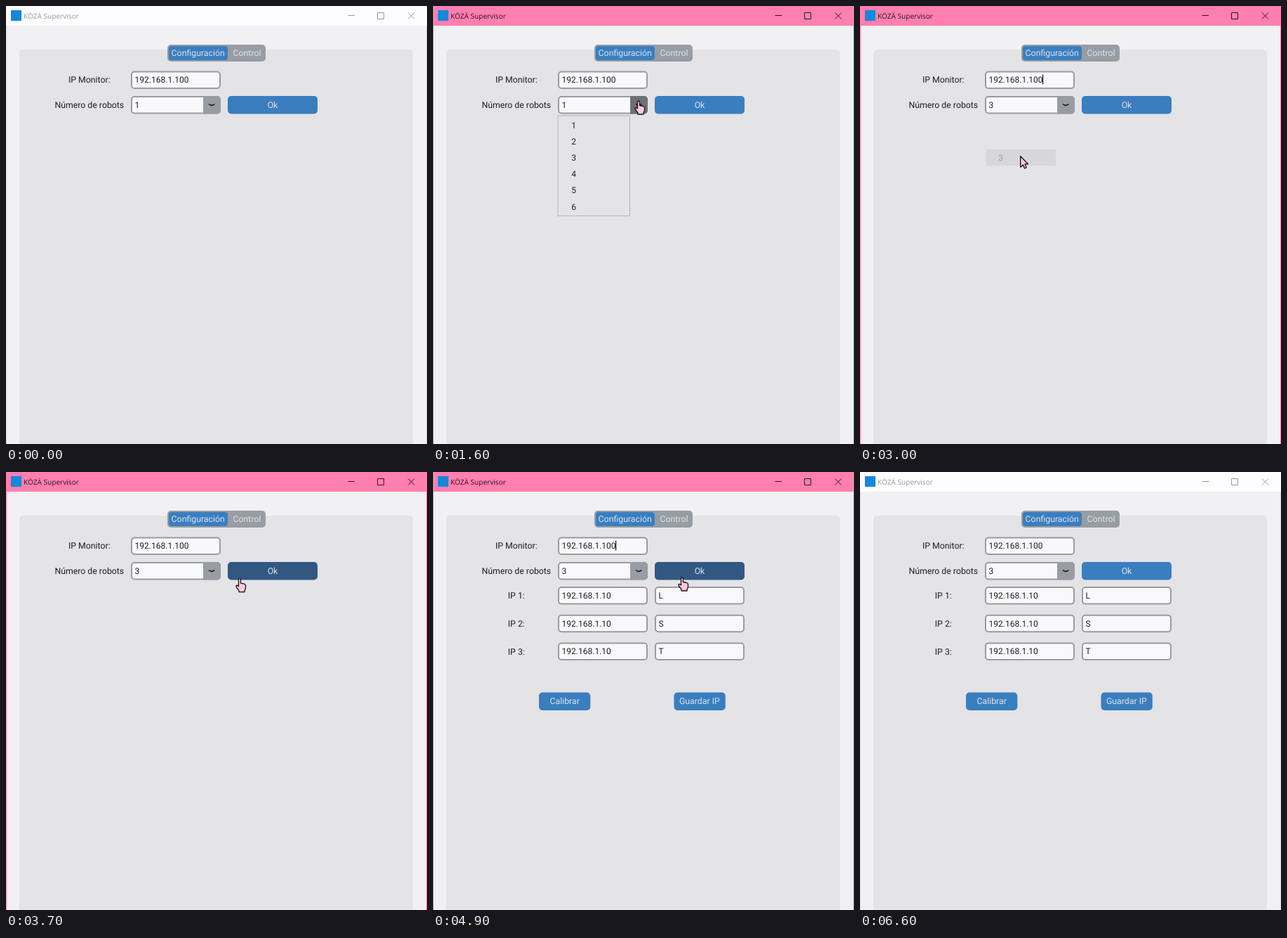
These frames come from a looping animation (600x623 px, 6700 ms). An HTML page:

```html
<!DOCTYPE html>
<html lang="es">
<head>
<meta charset="utf-8">
<title>Configuración</title>
<style>
  html, body { margin: 0; width: 100%; height: 100%; overflow: hidden; background: #f1f0f3; }
  svg { display: block; width: 600px; height: 623px; }
  text { font: 12.3px Roboto, sans-serif; fill: #1f1f21; text-rendering: geometricPrecision; white-space: pre; }
  .mid { text-anchor: middle; }
  .light { fill: #dce4ee; }
  .value { font-size: 12px; }
  .field { fill: #f9f9fb; stroke: #979da2; stroke-width: 2; }
  .button { fill: #3a7ebf; }
  .button.hover { fill: #325882; }
  .grey { fill: #979da2; }
  .grey.hover { fill: #6e7174; }
  .pointer { fill: #ffc9de; stroke: #141014; stroke-width: 1.3; stroke-linejoin: round; }

  #bar { fill: #fdfcfe; }
  #edges { fill: #dcdbde; }
  #caption { font: 10.1px "Open Sans", sans-serif; fill: #99979a; }
  #controls { fill: none; stroke: #99979a; }
  .active #bar, .active #edges { fill: #ff7fae; }
  .active #caption { fill: #2b1620; }
  .active #controls { stroke: #2b1620; }
</style>
</head>
<body>
<svg id="stage" viewBox="0 0 600 623">
  <rect width="600" height="623" fill="#f1f0f3"/>
  <path id="edges" d="M0 28h1v595h-1zM599 28h1v595h-1z"/>
  <rect id="bar" width="600" height="28"/>
  <rect x="7" y="6" width="15" height="15" fill="#1488dc"/>
  <text id="caption" x="25" y="18">KÖZÄ Supervisor</text>
  <path id="controls" d="M487.500 13.500h9.500M529.500 9.500h9v9h-9zM573 9.500l9 9M582 9.500l-9 9"/>

  <rect x="19" y="62" width="561" height="580" rx="5" fill="#e4e3e6"/>
  <rect class="grey" x="230" y="55" width="140" height="24" rx="5"/>
  <rect class="button" x="232" y="57" width="84" height="20" rx="4"/>
  <text class="mid light" x="273.700" y="71">Configuración</text>
  <text class="mid light" x="343.500" y="71">Control</text>

  <text class="mid" x="118.800" y="109.200">IP Monitor:</text>
  <rect class="field" x="179" y="93.500" width="126" height="23.500" rx="4"/>
  <text class="value" x="183.600" y="109">192.168.1.100</text>
  <rect id="caret" x="260" y="97.500" width="1.200" height="14" fill="#111"/>

  <text class="mid" x="118.800" y="144.700">Número de robots</text>
  <rect class="field" x="179" y="129" width="126" height="23.500" rx="4"/>
  <path id="drop" class="grey" d="M281 128h20a5 5 0 0 1 5 5v15.500a5 5 0 0 1-5 5h-20z"/>
  <path d="M289.500 139.700q3.700 3.300 7.400 0" fill="none" stroke="#161616" stroke-width="1.500" stroke-linecap="round"/>
  <text id="count" class="value" x="183.600" y="144.600">1</text>
  <rect id="ok" class="button" x="316" y="128" width="128" height="25.500" rx="5"/>
  <text class="mid light" x="380" y="144.600">Ok</text>

  <g id="labels"></g>
  <g id="entries"></g>
  <g id="actions">
    <rect class="button" x="151" y="313.500" width="73.300" height="25.500" rx="5"/>
    <text class="mid light" x="187.700" y="330.200">Calibrar</text>
    <rect class="button" x="343.500" y="313.500" width="73.300" height="25.500" rx="5"/>
    <text class="mid light" x="379.900" y="330.200">Guardar IP</text>
  </g>

  <rect id="menu" x="178" y="156" width="102.500" height="142.500" fill="#e4e3e6" stroke="#b4b3b6"/>
  <rect id="highlight" x="179.500" width="99.500" height="23.300" fill="#bdbcbe"/>
  <g id="options"></g>
  <text id="picked" class="value" x="197.200" y="220">3</text>

  <path id="arrow" class="pointer" d="M.7.800V16.200L4.300 12.900 6.700 18 9.300 16.900 7 11.800H11.500z"/>
  <path id="hand" class="pointer" d="M-1.500 11V1.500a1.500 1.500 0 0 1 3 0V6.500l5 1q2 .6 2 2.500v3q0 2-1.500 4v2h-8v-2L-5 11.500q-.5-2.200 1.300-2z"/>
</svg>
<script>
const LOOP = 6700, STEP = 100;
const ROW_TOP = 157.6, ROW_HEIGHT = 23.2;
const el = id => document.getElementById(id);
const show = (id, visible) => { el(id).style.display = visible ? '' : 'none'; };
const between = (t, from, to) => t >= from && t < to;

const field = (x, y, value) =>
  `<rect class="field" x="${x + 1}" y="${y - 11.7}" width="126" height="23.5" rx="4"/>
   <text class="value" x="${x + 5.6}" y="${y + 4}">${value}</text>`;
const rowY = i => 175.8 + 39.7 * i;
const robots = ['L', 'S', 'T'];

el('labels').innerHTML = robots.map((_, i) =>
  `<text class="mid" x="118.8" y="${rowY(i) + 4.4}">IP ${i + 1}:</text>`).join('');
el('entries').innerHTML = robots.map((name, i) =>
  field(178, rowY(i), '192.168.1.10') + field(316, rowY(i), name)).join('');
el('options').innerHTML = [1, 2, 3, 4, 5, 6].map(n =>
  `<text class="value" x="197.2" y="${173.6 + ROW_HEIGHT * (n - 1)}">${n}</text>`).join('');

// Pointer path: time, x, y
const path = [
  [600, 294, 136], [700, 293, 135], [1600, 293, 135], [2200, 228, 213],
  [3000, 228, 213], [3400, 300, 154], [3900, 355, 150], [4900, 355, 150], [5400, 610, 240]
];
const caretTimes = [[2000, 2600], [2900, 3500], [3800, 4400], [4600, 5200], [5600, 6000]];

function pointerAt(t) {
  const next = path.findIndex(key => key[0] > t);
  if (next < 1) return null;
  const [t0, x0, y0] = path[next - 1], [t1, x1, y1] = path[next];
  const k = (t - t0) / (t1 - t0);
  return { x: x0 + (x1 - x0) * k, y: y0 + (y1 - y0) * k };
}

function draw(t) {
  el('stage').classList.toggle('active', between(t, 1600, 6600));
  show('caret', caretTimes.some(([from, to]) => between(t, from, to)));

  const p = pointerAt(t);
  const inRow = p && between(p.y, 128, 154);
  const onDrop = inRow && between(p.x, 281, 306);
  const onOk = inRow && between(p.x, 316, 444);
  const isHand = t >= 700 && (onDrop || onOk);
  el('drop').classList.toggle('hover', !!onDrop && t >= 900);
  el('ok').classList.toggle('hover', !!onOk);
  show('arrow', p && !isHand);
  show('hand', p && isHand);
  if (p) for (const id of ['arrow', 'hand'])
    el(id).setAttribute('transform', `translate(${p.x} ${p.y})`);

  // The chosen row lingers and fades after the menu closes.
  const open = between(t, 1600, 2800), fading = between(t, 2800, 3200);
  const row = fading ? 2 : p ? Math.floor((p.y - ROW_TOP) / ROW_HEIGHT) : -1;
  const fade = fading ? 1 - (t - 2700) / 450 : 1;
  show('menu', open);
  show('options', open);
  show('picked', fading);
  show('highlight', fading || open && row >= 0 && p.x < 281);
  el('highlight').setAttribute('y', ROW_TOP + ROW_HEIGHT * row);
  el('highlight').style.opacity = el('picked').style.opacity = fade;

  el('count').textContent = t < 2800 ? 1 : 3;
  show('labels', t >= 4200);
  show('actions', t >= 4200);
  show('entries', t >= 4400);
}

function tick() {
  draw(Math.floor(performance.now() % LOOP / STEP) * STEP);
  requestAnimationFrame(tick);
}
tick();
</script>
</body>
</html>
```
